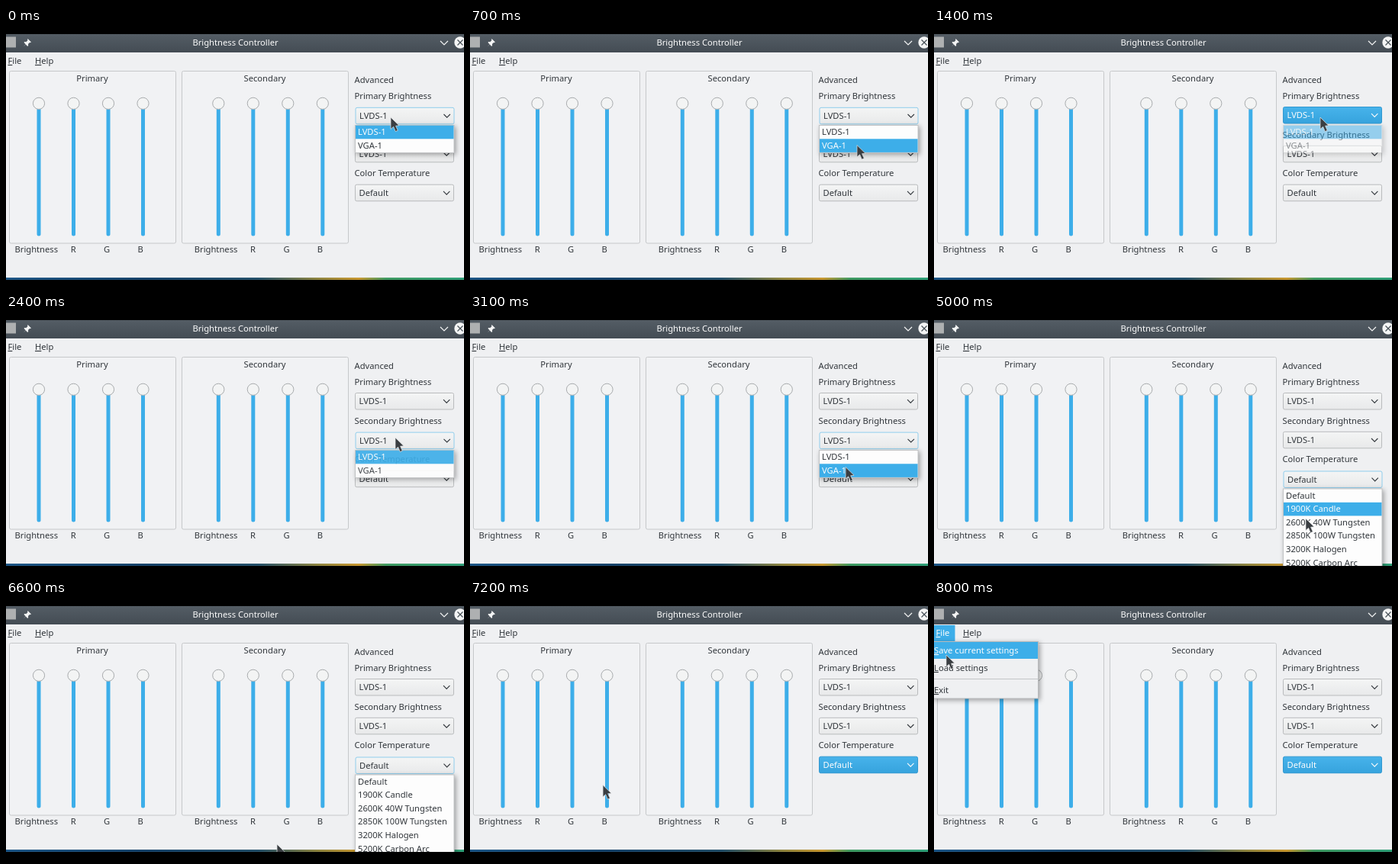
These frames come from a looping animation (600x338 px, 8.1 s). An HTML page:

```html
<!DOCTYPE html>
<html lang="en">
<head>
<meta charset="utf-8">
<title>Brightness Controller</title>
<style>
  html, body { margin: 0; width: 100%; height: 100%; overflow: hidden; background: #000; }
  svg { display: block; width: 600px; height: 338px; font: 11.2px "Noto Sans", sans-serif; }
  text { fill: #31363b; white-space: pre; }
  .lit { fill: #fcfcfc; }
  .popup { filter: drop-shadow(2px 2px 3px rgba(0, 0, 0, .35)); }
</style>
</head>
<body>
<svg id="stage" viewBox="0 0 600 338">
  <defs>
    <linearGradient id="bar" x2="0" y2="1">
      <stop stop-color="#545d65"/><stop offset="1" stop-color="#434b53"/>
    </linearGradient>
    <linearGradient id="button" x2="0" y2="1">
      <stop stop-color="#f4f5f5"/><stop offset="1" stop-color="#e8e9ea"/>
    </linearGradient>
    <linearGradient id="active" x2="0" y2="1">
      <stop stop-color="#47b3eb"/><stop offset="1" stop-color="#36a3dd"/>
    </linearGradient>
    <linearGradient id="desk">
      <stop stop-color="#1d5686"/><stop offset=".3" stop-color="#17436a"/>
      <stop offset=".55" stop-color="#24506a"/><stop offset=".68" stop-color="#8d8440"/>
      <stop offset=".77" stop-color="#c7962f"/><stop offset=".83" stop-color="#3f9a62"/>
      <stop offset="1" stop-color="#2f9f78"/>
    </linearGradient>
  </defs>
</svg>
<script>
const LOOP = 8100, STEP = 100;
const BLUE = '#3daee9', INK = '#31363b', PANEL = '#eff0f2';
const stage = document.getElementById('stage');

function add(tag, attrs, parent = stage) {
  const el = document.createElementNS('http://www.w3.org/2000/svg', tag);
  for (const key in attrs) el.setAttribute(key, attrs[key]);
  parent.append(el);
  return el;
}
const rect = (x, y, width, height, fill, parent, more) =>
  add('rect', { x, y, width, height, fill, ...more }, parent);
const line = (d, stroke, width, parent) =>
  add('path', { d, stroke, 'stroke-width': width, fill: 'none' }, parent);
function label(str, x, y, parent, more) {
  const el = add('text', { x, y, ...more }, parent);
  el.textContent = str;
  return el;
}
const centred = { 'text-anchor': 'middle' };

// Text with its first letter underlined
function mnemonic(str, x, y, parent) {
  const el = label('', x, y, parent);
  const first = add('tspan', { 'text-decoration': 'underline' }, el);
  first.textContent = str[0];
  el.append(str.slice(1));
  return el;
}

// Window frame
rect(0, 8, 600, 25, 'url(#bar)');
rect(0, 32, 600, 296, PANEL);
rect(0, 327, 600, 3, 'url(#desk)');
rect(0, 11.5, 13, 14, '#aeb0b1');
add('path', { d: 'M28.5 14l4.5 4.5-1.2.8-.8-.3-2 2 .2 2-1 .9-2.3-2.3-3 2.8 2.8-3.2-2.2-2.2.9-1 2 .2 2-2-.3-.8z', fill: '#f4f5f5' });
label('Brightness Controller', 300.5, 23.3, stage, { ...centred, class: 'lit' });
line('M569 17l5 5 5-5', '#f4f5f5', 1.2);
add('circle', { cx: 595, cy: 19, r: 7.7, fill: '#f4f5f5' });
line('M591.5 15.5l7 7m0-7l-7 7', '#475057', 1.2);

const fileTab = rect(0, 33, 27.5, 21.5, BLUE);
const fileText = mnemonic('File', 2.5, 47);
mnemonic('Help', 38, 47);

// Slider groups
function group(x, title, first) {
  rect(x + .5, 56.5, 218, 225.5, '#f1f2f4', stage, { stroke: '#c6c8ca', rx: 2 });
  label(title, x + 109, 70, stage, centred);
  for (let i = 0; i < 4; i++) {
    const cx = first + i * 45.5;
    rect(cx - 2.5, 98, 5, 174.5, BLUE, stage, { rx: 2.5 });
    add('circle', { cx, cy: 98.8, r: 7.6, fill: '#f3f4f4', stroke: '#a8abad' });
  }
  label('Brightness', first - 31.5, 293.5);
  ['R', 'G', 'B'].forEach((c, i) => label(c, first + 45.3 + i * 43.9, 293.5, stage, centred));
}
group(4, 'Primary', 43);
group(230, 'Secondary', 278.3);

// Right column
label('Advanced', 456.5, 71.7);
label('Primary Brightness', 456.5, 92.7);
label('Secondary Brightness', 456.5, 143.5);
label('Color Temperature', 456.5, 194.3);

function combo(value, y) {
  const g = add('g', {});
  const box = rect(457.5, y, 129, 21.5, 'url(#button)', g, { rx: 2 });
  const text = label(value, 462.5, y + 14.7, g);
  const arrow = line(`M573 ${y + 8.7}l4.2 4.2 4.2-4.2`, INK, 1.1, g);
  return state => {
    const focus = state === 'focus', open = state === 'open';
    box.setAttribute('fill', focus ? 'url(#active)' : 'url(#button)');
    box.setAttribute('stroke', focus ? '#3298d0' : open ? '#8fcdec' : '#b9bbbd');
    text.setAttribute('class', focus ? 'lit' : '');
    arrow.setAttribute('stroke', focus ? '#fcfcfc' : INK);
    g.setAttribute('transform', open ? 'translate(.5 .8)' : '');
  };
}
const displays = ['LVDS-1', 'VGA-1'];
const temps = ['Default', '1900K Candle', '2600K 40W Tungsten', '2850K 100W Tungsten',
  '3200K Halogen', '5200K Carbon Arc'];
const combos = [combo('LVDS-1', 103.5), combo('LVDS-1', 154.3), combo('Default', 205.2)];

function rowSetter(rows) {
  return n => rows.forEach(([bar, text], i) => {
    bar.setAttribute('opacity', i === n ? 1 : 0);
    text.setAttribute('class', i === n ? 'lit' : '');
  });
}
function popup(items, y, height) {
  const g = add('g', { class: 'popup' });
  rect(457.5, y + .5, 129.5, height, '#fdfdfd', g, { stroke: '#c0c2c4' });
  const rows = items.map((item, i) => {
    const top = y + .7 + i * 17.6;
    return [rect(458, top, 128.5, 17.6, BLUE, g), label(item, 461, top + 12.4, g)];
  });
  return { g, pick: rowSetter(rows) };
}
const popups = [popup(displays, 127, 36), popup(displays, 178, 36), popup(temps, 228.5, 130)];

function fileMenu() {
  const g = add('g', { class: 'popup' });
  rect(-2, 54.5, 138.5, 74.5, PANEL, g, { stroke: '#b9bbbd' });
  const rows = [['Save current settings', 66], ['Load settings', 89], ['Exit', 118]].map(([str, mid]) =>
    [rect(0, mid - 11, 136, 22, BLUE, g), mnemonic(str, 0, mid + 4, g)]);
  line('M0 103.5H136', '#c3c5c7', 1, g);
  return { g, pick: rowSetter(rows) };
}
const menu = fileMenu();

const cursor = add('path', {
  d: 'M0 0V15.5L3.6 12.3 6.3 18.6 9.3 17.2 6.6 11.2 11 10.8Z',
  fill: '#3a3e42', stroke: '#e4e6e7', 'stroke-width': .7, 'stroke-linejoin': 'round'
});
rect(0, 0, 600, 8, '#000');
rect(0, 330, 600, 8, '#000');

// Pointer stops: time, x, y
const path = [
  [0, 504, 117], [300, 505, 122], [600, 507, 155], [800, 507, 152], [1000, 506, 117],
  [1500, 506, 117], [2000, 510, 162], [2500, 510, 162], [2900, 498, 202], [3200, 490, 200],
  [3500, 484, 183], [3900, 484, 183], [4300, 485, 212], [4700, 485, 214], [5000, 487, 268],
  [5300, 488, 292], [5600, 488, 292], [6200, 400, 318], [6600, 355, 320], [6800, 340, 318],
  [7400, 116, 216], [7700, 9, 44], [7800, 10, 48], [8000, 16, 72]
];
// Highlighted row from each time on
const hover = [
  [[0, 0], [600, 1], [1000, 0]],
  [[0, 0], [2800, 1], [3400, 0]],
  [[0, 0], [5000, 1], [5100, 2], [5200, 3], [5800, -1]]
];
// Popup opening and closing times
const spans = [[-500, 1300], [2200, 3660], [4400, 6700]];

const clamp = v => Math.max(0, Math.min(1, v));
function pointer(t) {
  const i = path.findIndex(p => p[0] > t);
  if (i < 0) return path.at(-1).slice(1);
  const [a, b] = [path[i - 1], path[i]];
  const k = (t - a[0]) / (b[0] - a[0]);
  const s = k * k * (3 - 2 * k);
  return [a[1] + (b[1] - a[1]) * s, a[2] + (b[2] - a[2]) * s];
}
function fade(el, alpha) {
  el.style.opacity = alpha;
  el.style.display = alpha > 0 ? '' : 'none';
}

function draw(t) {
  const [x, y] = pointer(t);
  cursor.setAttribute('transform', `translate(${x} ${y})`);
  let focus = 0;
  spans.forEach(([from], i) => { if (t >= from) focus = i; });
  spans.forEach(([from, to], i) => {
    const open = t >= from && t < to;
    combos[i](open ? 'open' : i === focus ? 'focus' : '');
    fade(popups[i].g, clamp((t - from) / 220) * clamp(1 - (t - to) / 200));
    popups[i].pick(hover[i].filter(h => h[0] <= t).at(-1)[1]);
  });
  const inMenu = t >= 7700;
  fileTab.setAttribute('opacity', inMenu ? 1 : 0);
  fileText.setAttribute('class', inMenu ? 'lit' : '');
  fade(menu.g, clamp((t - 7650) / 200));
  menu.pick(y > 55 ? 0 : -1);
}

const start = performance.now();
function tick() {
  const t = (performance.now() - start) % LOOP;
  draw(Math.floor(t / STEP) * STEP);
  requestAnimationFrame(tick);
}
tick();
</script>
</body>
</html>
```
